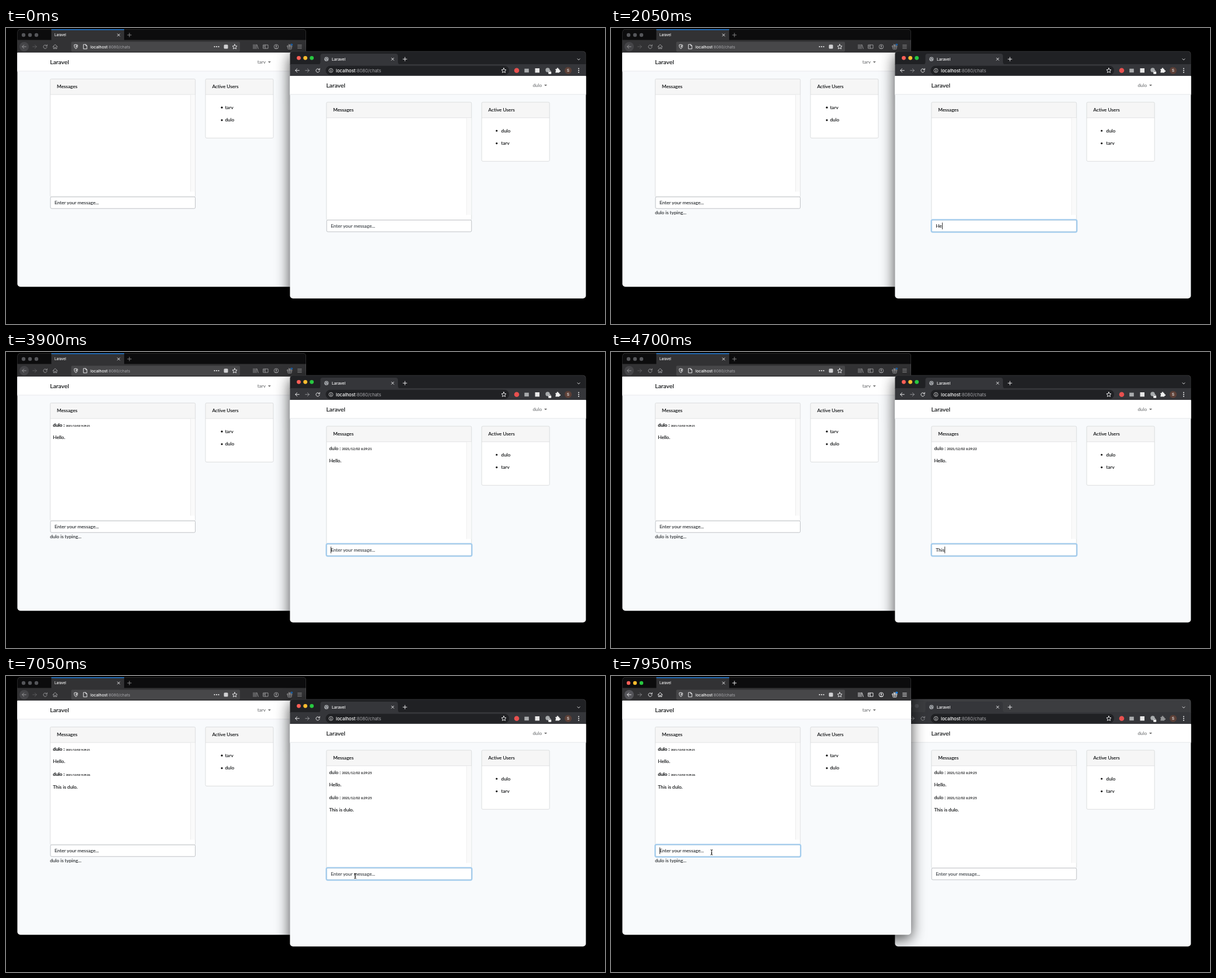
Animation of 1024 by 507 pixels, one loop 8 s. Source, as an HTML page:

```html
<!DOCTYPE html>
<html lang="en">
<head>
<meta charset="utf-8">
<title>Chat demo</title>
<style>
  html, body { margin: 0; width: 100%; height: 100%; overflow: hidden; background: #000; }
  svg { display: block; width: 100vw; height: 100vh; }
  text { white-space: pre; }
  .app { font-family: Lato, "Open Sans", sans-serif; font-size: 8.2px; fill: #080a0c; }
  .app text { stroke: #080a0c; stroke-width: .2px; stroke-opacity: .6; }
  .ui { font-family: Inter, "Liberation Sans", sans-serif; font-weight: 500; fill: #fff; }
  .dim { fill: #a9a9ad; font-weight: 400; }
  .line { fill: none; stroke: #e4e4e6; stroke-width: 1; stroke-linecap: round; stroke-linejoin: round; }
  .window { filter: drop-shadow(0 6px 9px rgba(0, 0, 0, .4)); }
  .window.active { filter: drop-shadow(0 7px 12px rgba(0, 0, 0, .72)); }
</style>
</head>
<body>
<svg id="stage" viewBox="0 0 1024 507" xmlns="http://www.w3.org/2000/svg">
  <rect width="1024" height="507" fill="#000"/>
  <g id="windows"></g>
  <g id="cursor">
    <path id="arrow" d="M0 0V8.2L1.9 6.5L3.2 9.4L4.7 8.7L3.4 5.9H5.8Z" fill="#000" stroke="#fff" stroke-width=".7"/>
    <path id="beam" d="M-1.8-4.4Q0-4.4 0-3V3Q0 4.4-1.8 4.4M1.8-4.4Q0-4.4 0-3M0 3Q0 4.4 1.8 4.4M-1 1.2H1" fill="none" stroke="#111" stroke-width="1"/>
  </g>
</svg>
<script>
const LOOP = 8000;
const HOST = 'dulo', GUEST = 'tarv';
const DAY = '2021/12/02 ';
const PLACEHOLDER = 'Enter your message...';
const LIGHTS = ['#ff5f57', '#febc2e', '#28c840'];
const $ = id => document.getElementById(id);

const rect = (x, y, w, h, fill, extra = '') =>
  `<rect x="${x}" y="${y}" width="${w}" height="${h}" fill="${fill}" ${extra}/>`;
const circle = (x, y, r, fill, extra = '') =>
  `<circle cx="${x}" cy="${y}" r="${r}" fill="${fill}" ${extra}/>`;
const text = (x, y, content, extra = '') => `<text x="${x}" y="${y}" ${extra}>${content}</text>`;
const line = (d, extra = '') => `<path class="line" d="${d}" ${extra}/>`;
const at = (x, y, content, extra = '') => `<g transform="translate(${x} ${y})" ${extra}>${content}</g>`;

const icons = {
  back: line('M3.3 0H-3.3M-.3-3L-3.3 0L-.3 3'),
  forward: line('M-3.3 0H3.3M.3-3L3.3 0L.3 3'),
  reload: line('M2.6-1.6A3.1 3.1 0 1 0 3.1.7M3.3-3.4V-1.1H1'),
  home: line('M-4 0L0-3.7L4 0M-2.8-.6V3.5H-.8V1H.8V3.5H2.8V-.6'),
  shield: line('M0-3.7L3-2.7Q3.2 2 0 3.8Q-3.2 2-3-2.7Z') + '<path d="M0-2.5V2.5Q2-.2 2-2Z" fill="#ddd"/>',
  page: line('M-2.8-3.8H.8L2.8-1.7V3.8H-2.8ZM.8-3.8V-1.7H2.8'),
  star: line('M0-4L1.2-1.3L4-1L1.9 1L2.5 3.8L0 2.4L-2.5 3.8L-1.9 1L-4-1L-1.2-1.3Z'),
  library: line('M-4-3.5V3.5M-1.6-3.5V3.5M.8-3.5V3.5M2-3.3L4.2 3.5'),
  sidebar: line('M-4-3H4V3H-4ZM-.8-3V3M-3-1.3H-2M-3 .3H-2'),
  account: line('M-2.3 2.7Q0 .6 2.3 2.7') + circle(0, 0, 3.8, 'none', 'stroke="#e4e4e6"') + circle(0, -.9, 1.4, '#e4e4e6'),
  gift: line('M-3.8-1.5H3.8V.5H-3.8ZM-3 .5V4H3V.5M0-1.5V4M0-1.5Q-3-4-1.6-4Q0-4 0-1.5Q0-4 1.6-4'),
  menu: line('M-3.3-2.7H3.3M-3.3 0H3.3M-3.3 2.7H3.3'),
  close: line('M-2-2L2 2M2-2L-2 2'),
  plus: line('M-3.2 0H3.2M0-3.2V3.2'),
  chevron: line('M-2-1L0 1L2-1'),
  info: circle(0, 0, 3.4, 'none', 'stroke="#ddd" stroke-width=".8"') + line('M0-.3V1.7M0-1.7V-1.6'),
  puzzle: '<path d="M-3.6-2.3H-1.3A1.4 1.4 0 1 1 1.2-2.3H3V0A1.4 1.4 0 1 1 3 2.5V4H-3.6V2.1A1.4 1.4 0 0 0-3.6-.4Z" fill="#f1f1f1"/>'
};
const icon = (name, x, y, extra) => at(x, y, icons[name], extra);
const lights = (id, xs, y, r) => xs.map((x, i) => circle(x, y, r, '#555', `id="${id}-light${i}"`)).join('');

function card(x, width, height, title) {
  return rect(x, 87.3, width, height, '#fff', 'rx="2"') +
    rect(x, 87.3, width, 26.7, '#f6f6f6') +
    `<path d="M${x} 114H${x + width}" stroke="#d9dadb" stroke-width=".7"/>` +
    rect(x, 87.3, width, height, 'none', 'rx="2" stroke="#d5d7d9" stroke-width=".8"') +
    text(x + 11.4, 103.3, title);
}

function message(id, index, body, bold, stampSize) {
  const y = 127.9 + index * 43.1;
  return `<g id="${id}-message${index}">` +
    `<text x="80.3" y="${y}"><tspan font-weight="${bold ? 700 : 400}">${HOST} : </tspan>` +
    `<tspan id="${id}-stamp${index}" font-size="${stampSize}"></tspan></text>` +
    text(80.3, y + 21.5, body) + '</g>';
}

// Chat page in the left window's coordinates
function page(id, users, left, width, bold, stampSize, bullet) {
  return `<g class="app">` +
    rect(left, 42.3, width, 420, '#f8fafc') +
    rect(left, 43, width, 32.2, '#f3f5f7') + rect(left, 43, width, 31.2, '#e9ebed') +
    rect(left, 42.3, width, 31, '#fff') +
    text(75.3, 62, 'Laravel', 'font-size="10.4"') +
    text(444, 61.2, users[0], 'text-anchor="end" fill="#77797b" style="stroke:#77797b"') +
    '<path d="M447.8 57.2H452.8L450.3 59.8Z" fill="#666"/>' +
    card(75.6, 248, 202, 'Messages') +
    rect(315.2, 114.4, 8, 166, '#fafafa') + rect(315, 114.4, .6, 166, '#e6e6e6') +
    message(id, 0, 'Hello.', bold, stampSize) +
    message(id, 1, `This is ${HOST}.`, bold, stampSize) +
    card(341, 116, 101.2, 'Active Users') +
    users.map((name, i) => circle(bullet, 136.2 + i * 21.6, 1.6, '#111') +
      text(374.4, 138.8 + i * 21.6, name)).join('') +
    rect(76, 289.2, 247.6, 20, '#fff', 'rx="2" stroke="#b8bcc0" stroke-width=".9"') +
    rect(75.4, 288.6, 248.8, 21.2, 'none', `id="${id}-ring" rx="2.5" stroke="#a4cdee" stroke-width="2.3"`) +
    text(83, 302.1, PLACEHOLDER, `id="${id}-input"`) +
    rect(83, 293.5, .8, 11.5, '#000', `id="${id}-caret"`) +
    text(75.2, 319.3, `${HOST} is typing...`, `id="${id}-typing" fill="#33373b"`) +
    '</g>';
}

function frame(id, x, y, w, h, bars, body) {
  return `<g id="${id}" class="window"><clipPath id="${id}-clip">${rect(x, y, w, h, '#000', 'rx="5"')}</clipPath>` +
    `<g clip-path="url(#${id}-clip)">${bars}` +
    rect(x, y, w, h, 'none', 'rx="5" stroke="#888" stroke-opacity=".5"') + body + '</g></g>';
}

function address(x, y, size) {
  return `<text class="ui" x="${x}" y="${y}" font-size="${size}">localhost<tspan class="dim">:8080/chats</tspan></text>`;
}

const leftBars =
  rect(19, 2, 495, 19, '#0c0c0d') + rect(77.5, 2, 124.5, 19, '#323234') + rect(77.5, 2, 124.5, 1.4, '#0a84ff') +
  rect(19, 20.5, 495, 22.7, '#323234') +
  lights('left', [30, 41, 52], 12, 3.2) +
  text(83, 14.3, 'Laravel', 'class="ui" font-size="5.7"') + icon('close', 192.5, 12) +
  rect(111.5, 23.5, 288.5, 17, '#474749', 'rx="2"') +
  icon('shield', 119.5, 32) + icon('page', 135.5, 32) + address(144.3, 34.7, 6.75) +
  [356.5, 360, 363.5].map(x => circle(x, 32, 1.1, '#eee')).join('') +
  rect(372.5, 28.5, 7, 7, '#d0d0d2', 'rx="1.5"') + icon('star', 391, 32) +
  `<g id="left-tools">${circle(31, 32, 8, '#55555a')}` +
  icon('back', 31, 32) + icon('forward', 49, 32, 'opacity=".4"') + icon('reload', 67, 32) + icon('home', 84, 32) +
  icon('plus', 211, 12) + icon('library', 427, 32) + icon('sidebar', 444, 32) + icon('account', 462, 32) +
  icon('gift', 485, 32) + circle(488.5, 28.5, 1.8, '#0a84ff') + icon('menu', 502, 32) + '</g>';

const rightBars =
  rect(485, 39, 507, 24, '#202124', 'id="right-strip"') +
  '<path d="M534 63Q537.5 62 537.5 58V48Q537.5 44 541.5 44H666Q670 44 670 48V58Q670 62 673.5 63Z" fill="#35363a"/>' +
  rect(485, 62, 507, 21, '#35363a') +
  lights('right', [500.5, 511.7, 522.7], 51.3, 3.4) +
  circle(547.8, 53.3, 3.7, '#a0a3a7') + line('M545 51.5Q547 52 547 54L548.5 56M548 50.5L550 53', 'style="stroke:#55585c"') +
  text(557, 55.7, 'Laravel', 'class="ui" font-size="6.7"') +
  icon('close', 661, 53.3) + icon('plus', 682, 53.3) + icon('chevron', 979, 53.8) +
  rect(546.5, 64.8, 313.5, 15.8, '#202124', 'rx="7.9"') +
  icon('info', 555.5, 72.8) + address(564, 75.5, 7.7) + icon('star', 851, 72.6) +
  circle(873, 72.7, 4.3, '#e8504f') + rect(886.3, 69.7, 7.5, 6.5, '#a9abad') + rect(904.5, 69, 7.5, 7.5, '#e8e8e8') +
  circle(926, 72, 3.7, '#a8abad') + rect(927.2, 75, 5, 3.8, '#f4f4f4', 'rx=".7"') +
  line('M928.4 75V73.7Q929.7 72.2 931 73.7V75') +
  circle(961, 72.7, 6, '#5d4037') + text(961, 75.1, 'S', 'class="ui" font-size="6.7" text-anchor="middle"') +
  [69.5, 72.7, 75.9].map(y => circle(979, y, 1, '#eee')).join('') +
  `<g id="right-tools">${icon('back', 498, 72.7)}${icon('reload', 533, 72.7)}${icon('puzzle', 943, 72.5)}</g>` +
  icon('forward', 515, 72.7, 'opacity=".5"');

$('windows').innerHTML =
  frame('left', 19.5, 2, 493.5, 441.2, leftBars, page('left', [GUEST, HOST], 19, 495, true, 4.5, 369)) +
  frame('right', 485.5, 39.7, 505.8, 423.5, rightBars,
    at(472.2, 39.8, page('right', [HOST, GUEST], 12.8, 507, false, 5.55, 366.6)));

const RAISE = 7350, ACTIVATE = 7480;
const drafts = [
  { text: 'Hello.', keys: [1700, 2050, 2350, 2550, 2800, 3250], sent: 3550, received: 3800 },
  { text: `This is ${HOST}.`, sent: 6450, received: 6750,
    keys: [4250, 4400, 4550, 4700, 4850, 5050, 5150, 5250, 5350, 5500, 5750, 5900, 6150] }
];
const ticks = [4400, 5250, 5750, 6450];
const path = [[250, 700, 456], [780, 629, 336.5], [7000, 629, 336.5], [7300, 212, 414.5], [7460, 212, 414.5], [7800, 172, 302]];

const show = (id, on) => $(id).setAttribute('visibility', on ? 'visible' : 'hidden');
const set = (id, name, value) => $(id).setAttribute(name, value);
const ramp = (t, start, length) => Math.min(1, Math.max(0, (t - start) / length));
const ease = p => p * p * (3 - 2 * p);

function typed(t) {
  const draft = drafts.find(d => t >= d.keys[0] && t < d.sent);
  return draft ? draft.text.slice(0, draft.keys.filter(k => t >= k).length) : '';
}

function drawMessages(t) {
  const clock = `${DAY}6:29:${21 + ticks.filter(k => t >= k).length}`;
  drafts.forEach((draft, i) => {
    show(`right-message${i}`, t >= draft.sent);
    show(`left-message${i}`, t >= draft.received);
    $(`right-stamp${i}`).textContent = clock;
    $(`left-stamp${i}`).textContent = `${DAY}9:29:${i ? 26 : 21}`;
  });
  show('left-typing', t >= 1900);
  show('right-typing', false);
}

function drawInputs(t) {
  const value = typed(t), input = $('right-input');
  input.textContent = value || PLACEHOLDER;
  input.setAttribute('fill', value ? '#212529' : '#50575e');
  $('left-input').setAttribute('fill', '#3a3f44');
  set('right-caret', 'x', 83 + (value ? input.getComputedTextLength() + .3 : 0));
  show('right-caret', (t >= 850 && t < 1100) || (t >= 1550 && t < 6750));
  show('left-caret', t >= 7900);
  set('right-ring', 'opacity', ramp(t, 800, 100) * (1 - ramp(t, ACTIVATE, 150)));
  set('left-ring', 'opacity', ramp(t, 7850, 100));
}

function drawWindows(t) {
  const raised = t >= RAISE, active = t >= ACTIVATE;
  const top = $(raised ? 'left' : 'right');
  if ($('windows').lastElementChild !== top) $('windows').append(top);
  $('left').classList.toggle('active', active);
  $('right').classList.toggle('active', !raised);
  LIGHTS.forEach((color, i) => {
    set(`left-light${i}`, 'fill', active ? color : '#55565a');
    set(`right-light${i}`, 'fill', raised ? '#505155' : color);
  });
  set('left-tools', 'opacity', active ? 1 : .55);
  set('right-tools', 'opacity', active ? .5 : 1);
  set('right-strip', 'fill', active ? '#3c3d40' : '#202124');
}

function drawCursor(t) {
  const next = path.findIndex(p => p[0] > t);
  const b = path.at(next), a = next > 0 ? path[next - 1] : b;
  const p = a === b ? 1 : ease(ramp(t, a[0], b[0] - a[0]));
  const x = a[1] + (b[1] - a[1]) * p, y = a[2] + (b[2] - a[2]) * p;
  const visible = (t >= 250 && t < 1700) || t >= 7000;
  const overInput = t < RAISE
    ? x > 548 && x < 796 && y > 329 && y < 349
    : x > 76 && x < 323 && y > 289 && y < 309;
  set('cursor', 'transform', `translate(${x} ${y})`);
  show('arrow', visible && !overInput);
  show('beam', visible && overInput);
}

function draw(t) {
  drawWindows(t);
  drawMessages(t);
  drawInputs(t);
  drawCursor(t);
}

const start = performance.now();
function tick(now) {
  draw(Math.max(0, now - start) % LOOP);
  requestAnimationFrame(tick);
}
draw(0);
requestAnimationFrame(tick);
</script>
</body>
</html>
```
